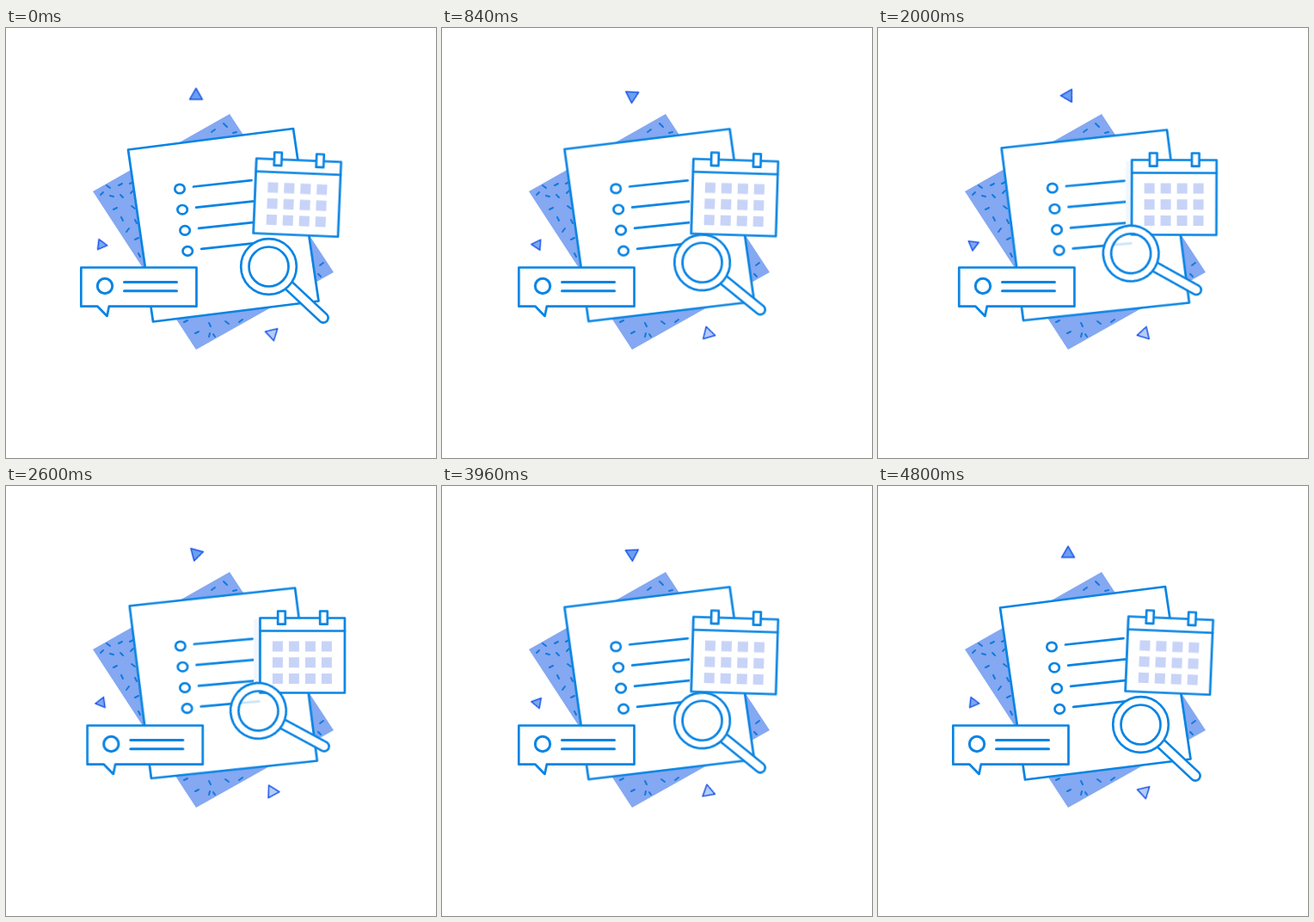
These frames come from a looping animation (500 px wide and 500 px high, 4.84 s). An HTML page without scripts:

```html
<!DOCTYPE html>
<html lang="en">
<head>
<meta charset="utf-8">
<title>Planning illustration</title>
<style>
  html, body { margin: 0; width: 100%; height: 100%; overflow: hidden; background: #fff; }
  svg { display: block; width: 100vw; height: 100vh; }

  .line { fill: none; stroke: #0984e3; stroke-width: 2.7; stroke-linecap: round; }
  .panel { fill: #fff; stroke: #0984e3; stroke-width: 2.7; stroke-linejoin: round; }
  .confetti { fill: none; stroke: #1279dc; stroke-width: 2; stroke-linecap: round; }
  .tri { stroke: #1450ea; stroke-width: 1.5; stroke-linejoin: round; }

  /* 4.8 s of motion, then one 40 ms hold */
  .sway { animation: sway 4.84s cubic-bezier(.37, 0, .63, 1) infinite; }
  .spin { animation: spin 4.84s linear infinite; }
  @keyframes sway {
    0%, 99.174%, 100% { transform: var(--from, none); }
    49.587% { transform: var(--to, none); }
  }
  @keyframes spin {
    from { transform: rotate(0deg); }
    99.174%, to { transform: rotate(var(--turn)); }
  }

  .page { transform-origin: 252.7px 229.3px; --from: rotate(0deg); --to: rotate(1.1deg); }
  .calendar {
    transform-origin: 344.8px 197px;
    --from: translate(-6.1px, .2px) rotate(2.4deg);
    --to: translate(0, 0) rotate(0deg);
  }
  .bubble { --from: translate(0, 0); --to: translate(7.4px, 0); }
  .lens { transform-origin: 237.5px 316px; --from: rotate(0deg); --to: rotate(-15deg); }
  .cw { --turn: 360deg; }
  .ccw { --turn: -360deg; }
</style>
</head>
<body>
<svg viewBox="0 0 500 500">
  <defs>
    <g id="item">
      <ellipse class="line" cx="202" cy="187" rx="5.7" ry="5.2"/>
      <path class="line" d="M218 184.5L285.5 177.2"/>
    </g>
    <g id="row" fill="#c7d4f8">
      <path d="M310 180.5h12v12h-12zM329 180.5h12v12h-12zM348 180.5h12v12h-12zM367 180.5h12v12h-12z"/>
    </g>
    <path id="clip" class="panel" d="M316.2 145.5h8.6v15.2h-8.6z"/>
    <path id="tri" d="M0-1L.866.5L-.866.5Z" vector-effect="non-scaling-stroke"/>
  </defs>

  <!-- backdrop -->
  <path fill="#84a8f1" d="M101 190L260 100L381 284L221 374Z"/>
  <path class="confetti" d="M117 183l4 3M131 183l4-2M144 181l4-2M110 194l3-3M121 195l4 1M133 194l3 3M145 192l3-3
    M125 211l4-2M134 220l2 4M146 207l4 3M140 237l3-4M150 246l4-2M150 223l2 4M154 262l2 4
    M253 111l4 4M239 121l4-3M264 122l4-1
    M207 342l4-2M220 355l4-2M236 343l2 4M255 341l4 3M271 342l4-3M236 359l1-4M241 356l2 3
    M365 276l4-3M363 286l3 3M200 333l3 3"/>

  <g class="sway page">
    <path class="panel" d="M142 141.5L334 117L363.5 317.5L171 341.5Z"/>
    <use href="#item"/>
    <use href="#item" x="3.1" y="24.2"/>
    <use href="#item" x="6.1" y="48.4"/>
    <use href="#item" x="9.2" y="72.4"/>
  </g>
  <path fill="#f2f7fe" d="M288 155h10v80h-10z"/>

  <g class="sway lens">
    <circle cx="305.5" cy="277.5" r="25" fill="#fff" fill-opacity=".78"/>
  </g>

  <g class="sway calendar">
    <path class="panel" d="M295.5 153.5H394V240.5H295.5Z"/>
    <path class="line" d="M296 168.5H394"/>
    <use href="#clip"/>
    <use href="#clip" x="49"/>
    <use href="#row"/>
    <use href="#row" y="18.8"/>
    <use href="#row" y="37.6"/>
  </g>

  <g class="sway lens">
    <path class="line" style="stroke-width:14" d="M329 299.5L369 337"/>
    <path class="line" style="stroke:#fff;stroke-width:8.6" d="M329 299.5L369 337"/>
    <circle cx="305.5" cy="277.5" r="27.7" fill="none" stroke="#fff" stroke-width="9.3"/>
    <circle class="line" cx="305.5" cy="277.5" r="32.3"/>
    <circle class="line" cx="305.5" cy="277.5" r="23"/>
  </g>

  <g class="sway bubble">
    <path class="panel" d="M87.3 278.5H221.5V323.7H119.8L117.5 335L106.5 323.7H87.3Z"/>
    <circle class="line" cx="115" cy="300" r="8.7" style="stroke-width:3"/>
    <path class="line" style="stroke-width:3" d="M137.5 295.5H198.5M137.5 305.7H198.5"/>
  </g>

  <g transform="translate(221 78.7)"><g class="spin cw" style="transform-origin:0 0">
    <use class="tri" href="#tri" fill="#6ba0f0" transform="scale(8.6)"/>
  </g></g>
  <g transform="translate(110.8 252)"><g class="spin ccw" style="transform-origin:0 0">
    <use class="tri" href="#tri" fill="#7ea8f2" transform="rotate(97) scale(7)"/>
  </g></g>
  <g transform="translate(309.5 355.4)"><g class="spin ccw" style="transform-origin:0 0">
    <use class="tri" href="#tri" fill="#b4ccf8" transform="rotate(47) scale(8.4)"/>
  </g></g>
</svg>
</body>
</html>
```
